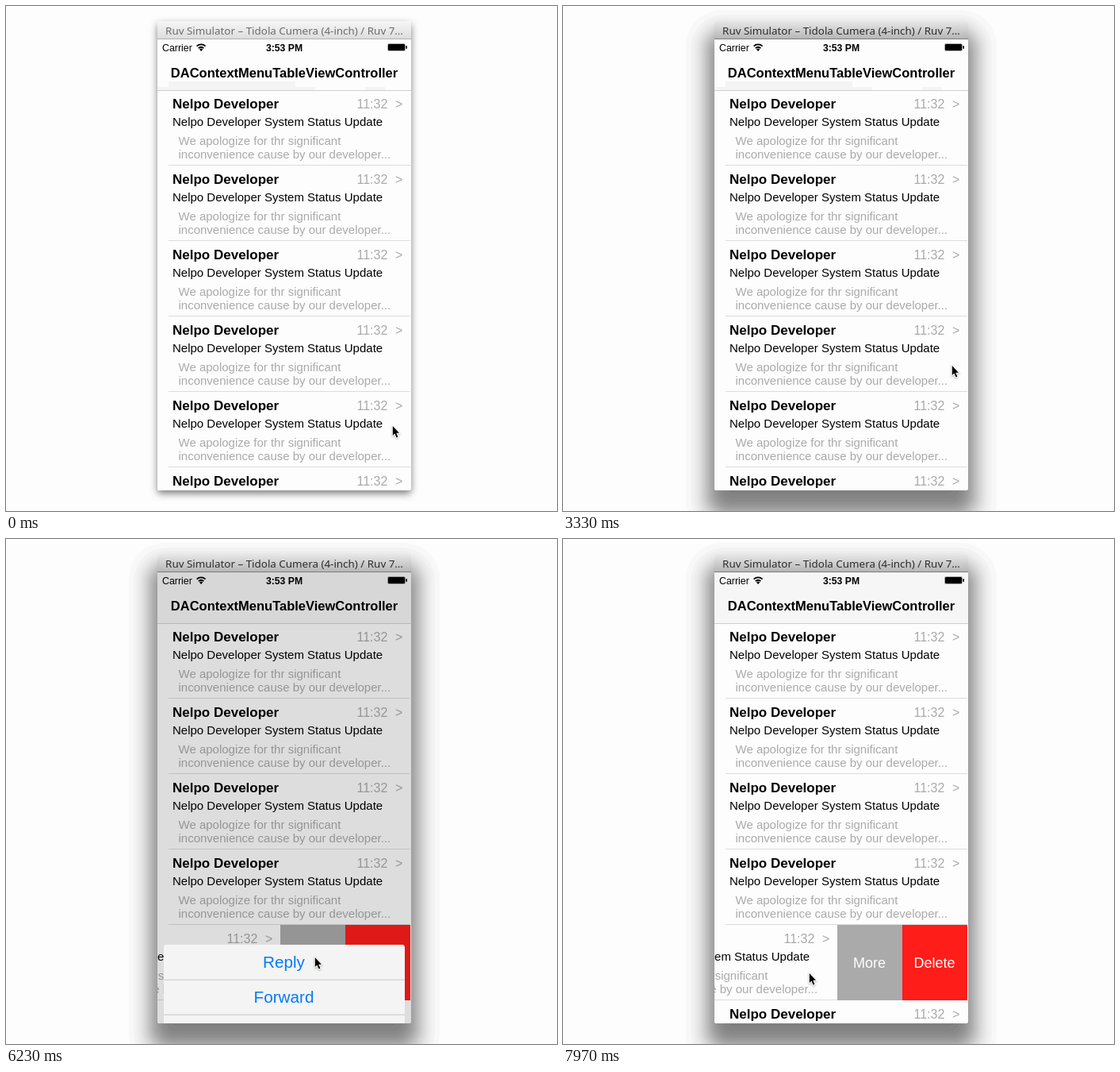
These frames come from a looping animation (695x636 px, 8000 ms). An HTML page:

```html
<!DOCTYPE html>
<html lang="en">
<head>
<meta charset="utf-8">
<title>Context menu table</title>
<style>
  html, body { margin: 0; width: 100%; height: 100%; overflow: hidden; background: #fdfdfd; }
  svg { display: block; width: 695px; height: 636px; font-family: "Liberation Sans", Arial, sans-serif; }
  .bold { font-weight: bold; }
  .mid { text-anchor: middle; }
  .soft { fill: #aaa; }
  .label { fill: #fdfdfd; font-size: 18px; text-anchor: middle; }
  .action { fill: #007aff; font-size: 20.7px; text-anchor: middle; }
  #caption { font: 13.4px "Noto Sans", "Open Sans", sans-serif; text-anchor: middle; }
  #idleShadow { filter: drop-shadow(0 4px 5px rgba(0, 0, 0, .5)); }
  #cursor { filter: drop-shadow(0 1px 1px rgba(0, 0, 0, .3)); }
</style>
</head>
<body>
<svg viewBox="0 0 695 636">
  <defs>
    <linearGradient id="barIdle" x2="0" y2="1">
      <stop stop-color="#f6f6f6"/><stop offset="1" stop-color="#dcdcdc"/>
    </linearGradient>
    <linearGradient id="barActive" x2="0" y2="1">
      <stop stop-color="#e8e8e8"/><stop offset="1" stop-color="#b4b4b4"/>
    </linearGradient>
    <clipPath id="screenClip"><path d="M191 42H511V607a3 3 0 0 1-3 3H194a3 3 0 0 1-3-3Z"/></clipPath>
    <clipPath id="tableClip"><rect x="191" y="107" width="320" height="503"/></clipPath>
    <clipPath id="panelClip">
      <rect x="199" y="286" width="304" height="264" rx="4"/>
      <rect x="199" y="558" width="304" height="44" rx="4"/>
    </clipPath>
    <filter id="blur"><feGaussianBlur stdDeviation="5"/></filter>
  </defs>

  <g id="activeShadow"></g>
  <rect id="idleShadow" x="191" y="19" width="320" height="591" rx="4" fill="#fdfdfd"/>

  <path id="bar" d="M191 42V24a5 5 0 0 1 5-5H506a5 5 0 0 1 5 5V42Z"/>
  <text id="caption" x="351" y="36">Ruv Simulator – Tidola Cumera (4-inch) / Ruv 7…</text>
  <rect id="barEdge" x="191" y="41" width="320" height="1"/>

  <g clip-path="url(#screenClip)">
    <rect x="191" y="42" width="320" height="568" fill="#fdfdfd"/>
    <g id="table" clip-path="url(#tableClip)"></g>

    <rect id="nav" x="191" y="42" width="320" height="64"/>
    <path id="navTint" fill="#f4f4f4" d="M191 102H205V95H365V102H390V106H191ZM453 102H478V106H453Z"/>
    <rect x="191" y="106" width="320" height="1" fill="#cfcfcf"/>
    <text class="bold mid" x="351" y="90" font-size="16.5">DAContextMenuTableViewController</text>
    <text x="197" y="56.5" font-size="12.4">Carrier</text>
    <g fill="none" stroke="#000" stroke-width="1.9">
      <path d="M240.6 50.6a8 8 0 0 1 11 0M242.8 53.1a5 5 0 0 1 6.6 0"/>
      <path fill="#000" stroke="none" d="M246.1 57l-2.2-2.4a3.2 3.2 0 0 1 4.4 0Z"/>
    </g>
    <text class="bold mid" x="351" y="56.5" font-size="12.2">3:53 PM</text>
    <rect x="482" y="48" width="21" height="8" rx="1"/>
    <rect x="481.5" y="47.5" width="22" height="9" rx="1.5" fill="none" stroke="#777" stroke-width=".6"/>
    <rect x="504.3" y="50" width="1.6" height="4" rx=".8"/>

    <rect id="dim" x="191" y="42" width="320" height="568"/>
    <g id="sheet">
      <g clip-path="url(#panelClip)">
        <rect x="199" y="286" width="304" height="316" fill="#f4f4f4"/>
        <rect x="430" y="487" width="90" height="91" rx="10" fill="#ffdada" filter="url(#blur)"/>
      </g>
    </g>
  </g>

  <path id="cursor" d="M.8 1V13L3.4 10.5 5.6 15.5 7.4 14.7 5.3 9.8H9Z"
    stroke="#fff" stroke-width="1.8" paint-order="stroke"/>
</svg>

<script>
const LOOP = 8000, STEP = 88.8, ROW = 95, TOP = 106;
const $ = id => document.getElementById(id);

function add(parent, tag, attrs, text) {
  const node = document.createElementNS('http://www.w3.org/2000/svg', tag);
  for (const key in attrs) node.setAttribute(key, attrs[key]);
  if (text) node.textContent = text;
  return parent.appendChild(node);
}

const move = (node, x, y) => node.setAttribute('transform', `translate(${x} ${y})`);

// Stepped falloff: each band is one grey level of a soft window shadow.
for (let p = .04; p < .98; p += .04) {
  const d = 9 - 8.5 * Math.log(p / (1 - p));
  const grey = Math.round(253 * (1 - .52 * p));
  add($('activeShadow'), 'rect', {
    x: 191 - d, y: 41 - d, width: 320 + 2 * d, height: 591 + 2 * d,
    rx: Math.max(6, 20 + d * .7), fill: `rgb(${grey},${grey},${grey})`
  });
}

function makeRow(i) {
  const row = add($('table'), 'g', {});
  move(row, 0, TOP + ROW * i);
  add(row, 'rect', { x: 191, width: 320, height: ROW, fill: '#fdfdfd' });
  add(row, 'rect', { x: 205, y: 94, width: 305, height: 1, fill: '#dcdcdc' });
  const menu = add(row, 'g', {});
  add(menu, 'rect', { x: 346, width: 82, height: ROW, fill: '#aaa' });
  add(menu, 'rect', { x: 428, width: 82, height: ROW, fill: '#ff1d1a' });
  add(menu, 'text', { x: 386.5, y: 54, class: 'label' }, 'More');
  add(menu, 'text', { x: 468.5, y: 54, class: 'label' }, 'Delete');

  const cell = add(row, 'g', {});
  const text = (x, y, size, cls, str) => add(cell, 'text', { x, y, 'font-size': size, class: cls }, str);
  add(cell, 'rect', { x: 191, width: 319, height: 94, fill: '#fdfdfd' });
  add(cell, 'rect', { x: 205, y: 94, width: 305, height: 1, fill: '#dcdcdc' });
  text(210, 23, 17, 'bold', 'Nelpo Developer');
  text(210, 44.5, 15, '', 'Nelpo Developer System Status Update');
  text(217.5, 68.5, 15, 'soft', 'We apologize for thr significant');
  text(217.5, 85.5, 15, 'soft', 'inconvenience cause by our developer...');
  text(442.5, 22.5, 16, 'soft', '11:32');
  text(491, 22.5, 16, 'soft', '>');
  return { row, cell, menu };
}
const rows = Array.from({ length: 7 }, (_, i) => makeRow(i));

['Reply', 'Forward', 'Flag', 'Mark as Unread', 'Move to Junk', 'Move Message...'].forEach((name, i) => {
  const y = 286 + 44 * i;
  if (i) add($('sheet'), 'rect', { x: 199, y, width: 304, height: 1, fill: '#c9c9cb' });
  add($('sheet'), 'text', { x: 350.5, y: y + 29, class: 'action' }, name);
});
add($('sheet'), 'text', { x: 350.5, y: 587, class: 'action bold' }, 'Cancel');

// Keys are [time, ...values], joined by straight segments.
function at(keys, t) {
  const n = keys.findIndex(key => key[0] > t);
  if (n === 0) return keys[0].slice(1);
  if (n < 0) return keys[keys.length - 1].slice(1);
  const a = keys[n - 1], b = keys[n], k = (t - a[0]) / (b[0] - a[0]);
  return a.slice(1).map((v, i) => v + (b[i + 1] - v) * k);
}

function ease(t, start, length) {
  const k = Math.min(1, Math.max(0, (t - start) / length));
  return k * k * (3 - 2 * k);
}

const pointer = [
  [0, 487, 528], [210, 486, 527], [480, 486, 527], [800, 468, 525], [1090, 386, 523],
  [1270, 291, 530], [1380, 285, 530], [1600, 285, 530], [2000, 410, 538], [2340, 499, 540],
  [2600, 499, 540], [2880, 515, 505], [3300, 490, 452], [3380, 489, 451], [3500, 482, 451],
  [3660, 482, 451], [4000, 335, 455], [4200, 305, 465], [4500, 448, 505], [4650, 468, 516],
  [4740, 468, 516], [5150, 305, 522], [5440, 290, 523], [5600, 247, 524], [5880, 388, 525],
  [6600, 389, 526], [6900, 379, 572], [7010, 378, 582], [7250, 377, 583], [7600, 377, 583],
  [7930, 310, 546]
];
const upperSwipe = [[3740, 0], [4060, 140], [4200, 164], [4800, 164], [5020, 0]];
const firstSwipe = [[720, 0], [1100, 152], [1180, 164]];
const secondSwipe = [[4820, 0], [5100, 135], [5260, 164]];
const DELETE_AT = 2600, DELETE_TIME = 330;

function swipe({ cell, menu }, shift) {
  move(cell, -shift, 0);
  menu.setAttribute('visibility', shift > 0 ? 'visible' : 'hidden');
}

function draw(time) {
  const t = Math.max(0, Math.floor((time - 5) / STEP) * STEP + 35);

  const active = t >= 560;
  $('activeShadow').setAttribute('visibility', active ? 'visible' : 'hidden');
  $('idleShadow').setAttribute('visibility', active ? 'hidden' : 'visible');
  $('bar').setAttribute('fill', active ? 'url(#barActive)' : 'url(#barIdle)');
  $('barEdge').setAttribute('fill', active ? '#7c7c7c' : '#b0b0b0');
  $('caption').setAttribute('fill', active ? '#2c2c2c' : '#6c6c6c');

  const deleted = t >= DELETE_AT + DELETE_TIME;
  rows.forEach(r => swipe(r, 0));
  swipe(rows[3], at(upperSwipe, t)[0]);
  swipe(rows[4], at(deleted ? secondSwipe : firstSwipe, t)[0]);
  const lift = deleted ? 0 : ROW * ease(t, DELETE_AT, DELETE_TIME);
  for (const i of [5, 6]) move(rows[i].row, 0, TOP + ROW * i - lift);

  const shown = ease(t, 6110, 380) - ease(t, 7590, 310);
  $('dim').setAttribute('opacity', .4 * shown);
  $('sheet').setAttribute('visibility', shown > 0 ? 'visible' : 'hidden');
  move($('sheet'), 0, 326 * (1 - shown));

  const tinted = t >= 6110;
  $('nav').setAttribute('fill', tinted ? '#f6f6f6' : '#fdfdfd');
  $('navTint').setAttribute('visibility', tinted ? 'hidden' : 'visible');

  const [x, y] = at(pointer, t);
  move($('cursor'), Math.round(x), Math.round(y));
}

let start;
function tick(now) {
  start ??= now;
  draw((now - start) % LOOP);
  requestAnimationFrame(tick);
}
draw(0);
requestAnimationFrame(tick);
</script>
</body>
</html>
```
